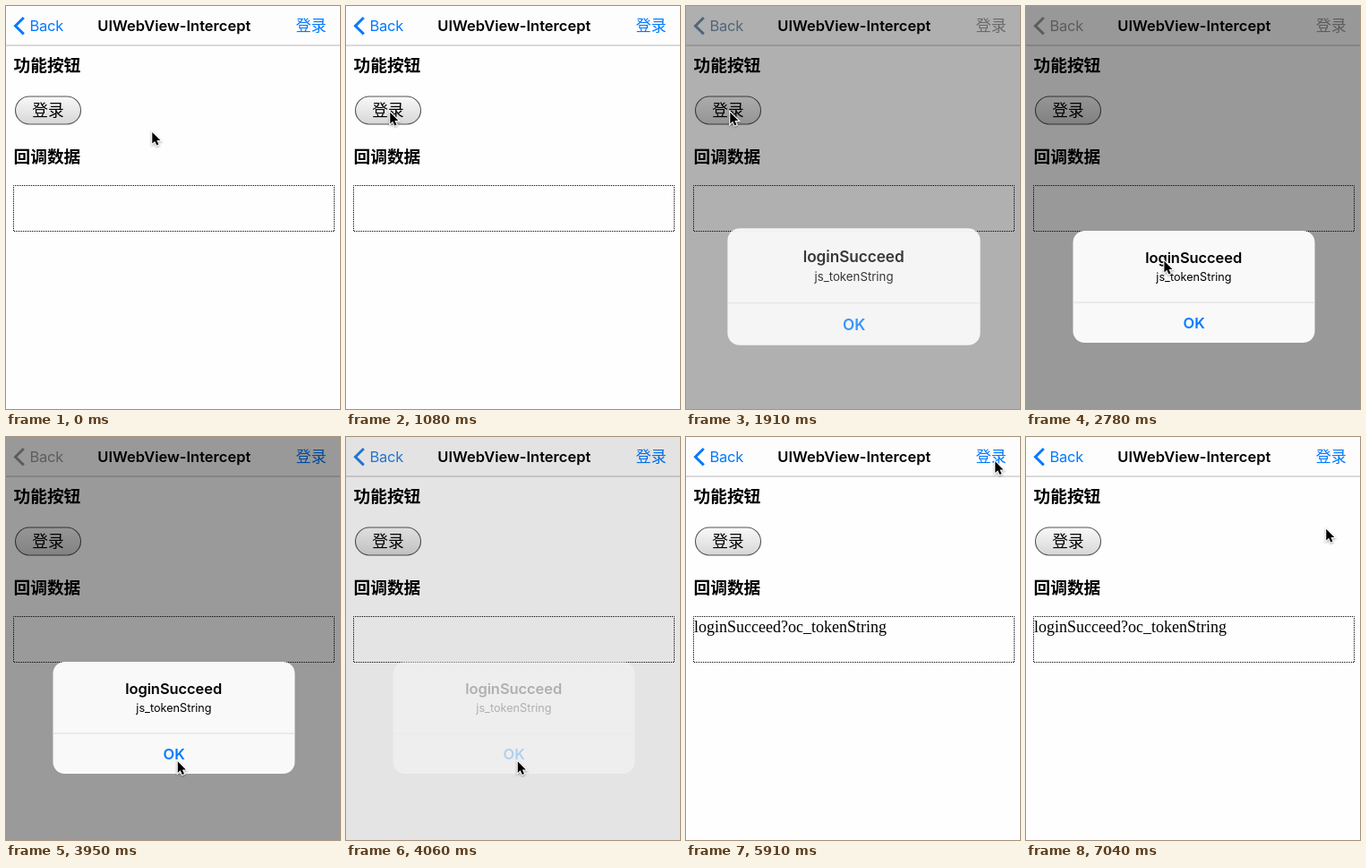
These frames come from a looping animation (373x450 px, 7.82 s). An HTML page:

```html
<!DOCTYPE html>
<html lang="zh">
<head>
<meta charset="utf-8">
<style>
  html, body { margin: 0; width: 100%; height: 100%; overflow: hidden; background: #fefefe; }
  svg { display: block; width: 373px; height: 450px; }
  text { font-family: Inter, "Noto Sans CJK SC", "Noto Sans CJK", sans-serif; font-size: 16.5px; }
  .cjk { font-family: "Noto Sans CJK SC", "Noto Sans CJK", sans-serif; }
  .heading { font-size: 18.72px; font-weight: 700; }
  .bold { font-weight: 600; }
  .mid { text-anchor: middle; }
  #cursor { filter: drop-shadow(0 1px .8px rgba(0, 0, 0, .35)); }
</style>
</head>
<body>
<svg viewBox="0 0 373 450">
  <defs>
    <linearGradient id="gloss" x2="0" y2="1">
      <stop offset="0" stop-color="#f8f8f8"/>
      <stop offset=".5" stop-color="#e8e8e8"/>
      <stop offset="1" stop-color="#d6d6d6"/>
    </linearGradient>
  </defs>

  <rect width="373" height="450" fill="#fefefe"/>
  <rect width="373" height="44" fill="#fdfdfd"/>
  <path d="M0 44H373" stroke="#b8b8b8"/>
  <g id="back">
    <path d="M19.8 13 10.5 22.2 19.8 31.4" fill="none" stroke="currentColor" stroke-width="3"/>
    <text x="26.5" y="28" fill="currentColor" style="letter-spacing:-.22px">Back</text>
  </g>
  <text class="bold mid" x="187.8" y="28">UIWebView-Intercept</text>
  <text id="login" class="cjk" x="323.7" y="28.3" style="font-size:17px" fill="currentColor">登录</text>

  <text class="cjk heading" x="8.5" y="73">功能按钮</text>
  <rect x="10.5" y="101" width="73" height="31" rx="15.5" fill="url(#gloss)" stroke="#555" stroke-width="1.1"/>
  <text class="cjk mid" x="47" y="123.3" style="font-size:17.7px">登录</text>
  <text class="cjk heading" x="8.5" y="174.5">回调数据</text>
  <rect x="8.5" y="200.5" width="358" height="51" fill="none" stroke="#000" stroke-dasharray="1 1" stroke-dashoffset=".5"/>
  <text id="result" x="9" y="218" style="font:18px 'Liberation Serif',serif">loginSucceed?oc_tokenString</text>

  <rect id="dim" width="373" height="450"/>
  <g id="alert">
    <rect id="panel" x="52.5" y="251" width="270" height="125" rx="13" fill="#f9f9f9"/>
    <g id="message">
      <path d="M52.5 331H322.5" stroke="#dcdcdc"/>
      <text class="bold mid" x="187.2" y="287.2" style="letter-spacing:-.08px">loginSucceed</text>
      <text class="mid" x="187.5" y="307.1" style="font-size:12.7px">js_tokenString</text>
      <text class="bold mid" x="187.7" y="359.8" fill="#007aff">OK</text>
    </g>
  </g>
  <path id="cursor" d="M0 0V12.6L2.9 9.9 5 14.6 7.2 13.6 5.1 9.1H9.1Z" stroke="#fff" stroke-width="2.2" paint-order="stroke"/>
</svg>
<script>
  const LOOP = 7820;
  const ALERT_IN = 1787, ALERT_OUT = 3945;
  const PRESS = 5150, RELEASE = 5330, RESULT = 5910;
  const BLUE = [0, 122, 255], GRAY = [153, 153, 153];

  const el = id => document.getElementById(id);
  const [back, login, result, dim, alertBox, panel, message, cursor] =
    ['back', 'login', 'result', 'dim', 'alert', 'panel', 'message', 'cursor'].map(el);

  const clamp = v => Math.min(1, Math.max(0, v));
  const smooth = u => u * u * (3 - 2 * u);
  const easeOut = u => 1 - (1 - u) ** 2.5;
  // Critically damped spring, settling in about 0.35 s.
  const spring = ms => {
    const x = Math.max(0, ms) * 0.0228;
    return x > 9 ? 1 : 1 - (1 + x) * Math.exp(-x);
  };
  const tint = k => `rgb(${BLUE.map((c, i) => Math.round(c + (GRAY[i] - c) * k))})`;

  // Each move: start, end, easing, then start, control and end points of a curve.
  const moves = [
    [300, 1080, smooth, [163.3, 141], [105, 130], [49.3, 118.8]],
    [2610, 2890, smooth, [49.3, 118.8], [128, 244], [208.3, 369]],
    [3070, 3300, smooth, [208.3, 369], [199, 366], [191.8, 362.3]],
    [4560, 4970, easeOut, [191.8, 362.3], [286, 192], [345.3, 27.3]],
    [6690, 7040, smooth, [345.3, 27.3], [328, 60], [335.3, 102.8]]
  ];

  function cursorAt(t) {
    const [start, end, ease, a, b, c] = moves.findLast(m => t >= m[0]) || moves[0];
    const u = ease(clamp((t - start) / (end - start))), v = 1 - u;
    return [0, 1].map(i => v * v * a[i] + 2 * u * v * b[i] + u * u * c[i]);
  }

  function draw(t) {
    const shown = spring(t - ALERT_IN);
    const leaving = spring(t - ALERT_OUT);
    const visible = shown * (1 - leaving);
    const scale = 1.2 - 0.2 * shown;

    dim.setAttribute('opacity', 0.4 * visible);
    panel.setAttribute('opacity', 1 - (1 - visible) ** 2);
    message.setAttribute('opacity', visible);
    alertBox.setAttribute('transform',
      `translate(187.5 313.5) scale(${scale}) translate(-187.5 -313.5)`);

    back.style.color = tint(visible);
    login.style.color = tint(t >= ALERT_IN && t < ALERT_OUT ? 1 : 0);
    login.setAttribute('opacity', t < PRESS ? 1 : 0.2 + 0.8 * smooth(clamp((t - RELEASE) / 340)));
    result.setAttribute('visibility', t >= RESULT ? 'visible' : 'hidden');
    cursor.setAttribute('transform', `translate(${cursorAt(t)})`);
  }

  const began = performance.now();
  function tick() {
    draw((performance.now() - began) % LOOP);
    requestAnimationFrame(tick);
  }
  tick();
</script>
</body>
</html>
```
